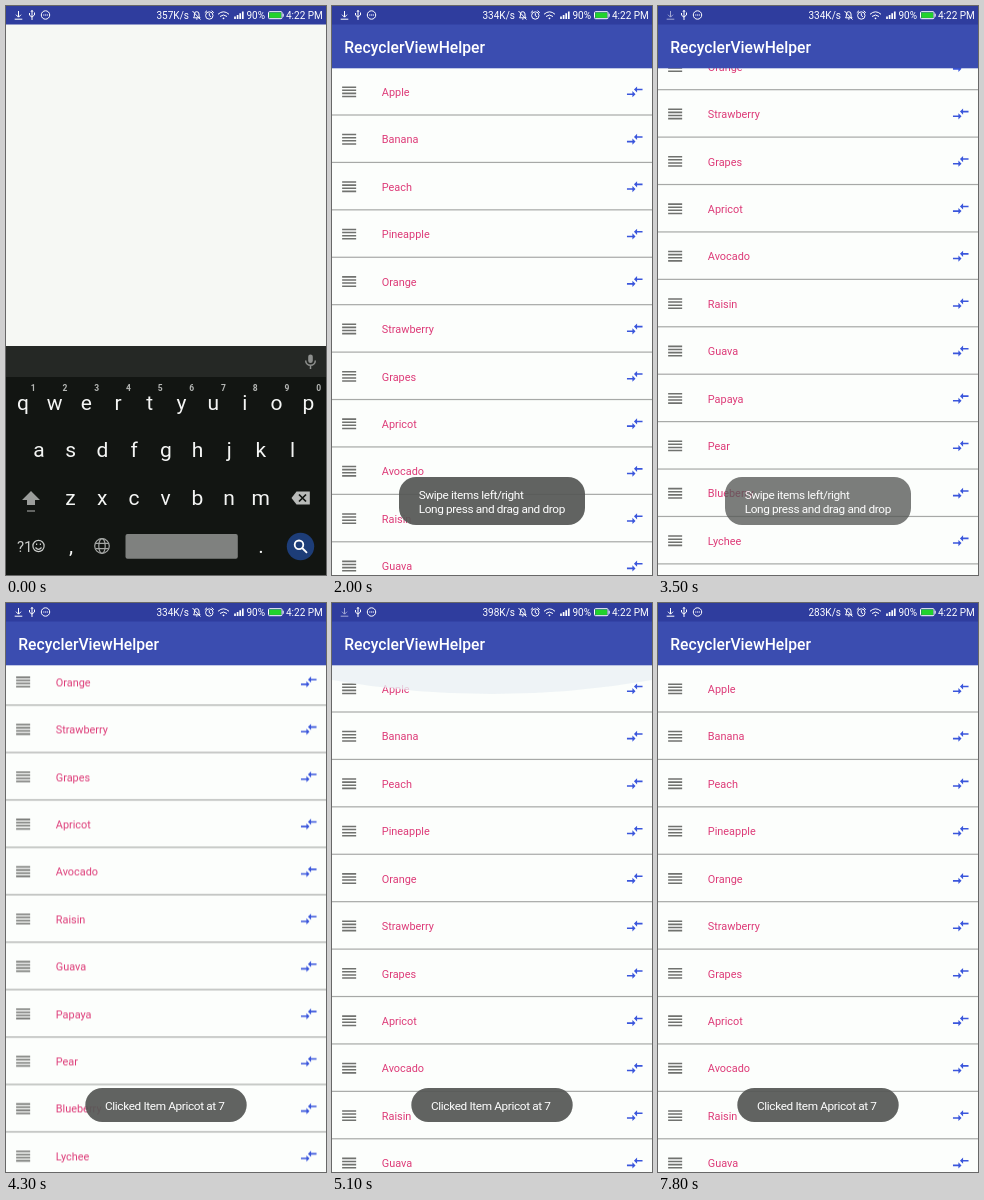
An HTML page that plays this animation: 320 by 569 pixels, repeating every 8 s.

```html
<!DOCTYPE html>
<html lang="en">
<head>
<meta charset="utf-8">
<title>RecyclerViewHelper</title>
<style>
html, body { margin: 0; width: 100%; height: 100%; overflow: hidden; background: #f6f8f4; }
svg { display: block; width: 100%; height: 100%; font-family: Roboto, sans-serif; }
.item { font-size: 10.9px; fill: #dd3b78; }
.title { font-size: 15.7px; font-weight: 500; fill: #fff; }
.status { font-size: 10px; fill: #fff; }
.line { fill: none; stroke: #fff; stroke-width: 1; }
.toast rect { fill: #565856; fill-opacity: .93; }
.toast text { font-size: 11.8px; letter-spacing: -.36px; fill: #fff; }
.key { font-size: 21px; fill: #f4f5f4; text-anchor: middle; }
.hint { font-size: 8.5px; font-weight: 700; fill: #b4b6b4; text-anchor: middle; }
#glow { transform-origin: 160px 62px; }
</style>
</head>
<body>
<svg viewBox="0 0 320 569">
  <defs>
    <g id="row">
      <rect y="46.4" width="320" height="1.2" fill="#a7a9a7"/>
      <path transform="translate(7.8 14.5) scale(.7788)" fill="#70726f"
        d="M3 5h18v2H3zM3 9h18v2H3zM3 13h18v2H3zM3 17h18v2H3z"/>
      <path transform="translate(293.4 14.5) scale(.7788)" fill="#3a56dc"
        d="M9 14H2v2h7v3l4-4-4-4zM15 13v-3h7V8h-7V5l-4 4z"/>
    </g>
  </defs>

  <rect width="320" height="569" fill="#f6f8f4"/>

  <g id="app">
    <rect y="62" width="320" height="507" fill="#fcfefc"/>
    <g id="list"></g>
    <path id="glow" d="M0 62H320V77Q160 105 0 77Z" fill="#eaf1f4" fill-opacity=".8"/>
    <rect y="18" width="320" height="44.3" fill="#3b4db0"/>
    <text class="title" x="12.3" y="46.7">RecyclerViewHelper</text>
  </g>

  <g id="keyboard">
    <rect y="340" width="320" height="229" fill="#121512"/>
    <rect y="340" width="320" height="31" fill="#252825"/>
    <g fill="none" stroke="#8e908e" stroke-width="1.5">
      <rect x="302.2" y="348.5" width="4.6" height="8.5" rx="2.3" fill="#8e908e" stroke="none"/>
      <path d="M299.7 354.5a4.8 4.8 0 0 0 9.6 0M304.5 359.5v3.5"/>
    </g>
    <g id="keys"></g>
    <path d="M25 485l9 9h-5v5h-8v-5h-5z" fill="#9b9d9b"/>
    <path d="M21 505h8" stroke="#777977" stroke-width="1.6"/>
    <path d="M285.5 492l5-6.5h13.3v13H290.500z" fill="#b9bbb9"/>
    <path d="M293 488.500l7 7m0-7l-7 7" stroke="#121512" stroke-width="1.7"/>
    <text x="11" y="546" font-size="15" fill="#c9cbc9">?1</text>
    <g fill="none" stroke="#c9cbc9" stroke-width="1.2">
      <circle cx="32.5" cy="540" r="5.6"/>
      <path d="M29.5 541.5q3 3.6 6 0M30.6 537.5v1.600M34.4 537.5v1.600"/>
    </g>
    <g fill="none" stroke="#a5a7a5" stroke-width="1.2">
      <circle cx="96" cy="540" r="7.3"/>
      <ellipse cx="96" cy="540" rx="3.2" ry="7.3"/>
      <path d="M89.500 537.4h13M89.500 542.6h13"/>
    </g>
    <rect x="119.5" y="528" width="112.300" height="24.700" rx="2" fill="#7f817f"/>
    <circle cx="294.5" cy="540.5" r="13.700" fill="#1d3d78"/>
    <g fill="none" stroke="#fff" stroke-width="1.8">
      <circle cx="293" cy="538.8" r="4.300"/>
      <path d="M296.200 542l4.800 4.800"/>
    </g>
  </g>

  <g id="toasts"></g>

  <rect width="320" height="18.500" fill="#2f3d9e"/>
  <g class="line">
    <path id="download" d="M12.500 5v6M10 8.700l2.500 2.500 2.500-2.500M8.700 13.200h7.600"/>
    <path d="M26 4.500v9.500M23.500 7v2.200l2.500 2M28.500 6.500v2.500l-2.500 2M25 5.800l1-1.500 1 1.500"/>
    <circle cx="39.500" cy="9" r="4.200"/>
    <path d="M37.200 9h1.200m.6 0h1.200m.6 0h1.200"/>
    <path d="M187.500 11.800h6.500l-1-1.600V8a2.300 2.300 0 0 0-4.600 0v2.200zM186.500 5l8 8.500M190 13h1.500"/>
    <circle cx="203.300" cy="9.500" r="3.700"/>
    <path d="M203.300 7.200v2.500l1.700 1M198.800 6.700l2.200-2M207.800 6.700l-2.200-2"/>
    <path d="M212 8.300q5.500-5 11 0M214 10.500q3.500-3 7 0"/>
    <circle cx="217.500" cy="12.300" r=".9" fill="#fff" stroke="none"/>
    <path stroke-width="1.700" d="M229 13v-2.500M231.600 13V9M234.200 13V7.200M236.800 13V5.500"/>
    <rect x="262.500" y="5.700" width="13.500" height="7" rx="1"/>
    <rect x="263.300" y="6.500" width="11.900" height="5.400" fill="#22d32c" stroke="none"/>
    <path d="M277.200 7.700v3"/>
  </g>
  <g id="speeds" class="status"></g>
  <text class="status" x="240.500" y="12.800">90%</text>
  <text class="status" x="280" y="12.800">4:22 PM</text>
</svg>

<script>
const LOOP = 8000;
const $ = id => document.getElementById(id);

function add(parent, tag, attrs, text = '') {
  const el = document.createElementNS('http://www.w3.org/2000/svg', tag);
  for (const name in attrs) el.setAttribute(name, attrs[name]);
  el.textContent = text;
  return parent.appendChild(el);
}

// steps: [time, value, easing towards the next step]
function play(el, prop, steps) {
  const full = [[0, steps[0][1]], ...steps, [LOOP, steps.at(-1)[1]]];
  el.animate(full.map(([time, value, easing = 'linear']) =>
    ({ offset: time / LOOP, [prop]: value, easing })),
    { duration: LOOP, iterations: Infinity });
}

const fruits = ['Apple', 'Banana', 'Peach', 'Pineapple', 'Orange', 'Strawberry', 'Grapes', 'Apricot',
  'Avocado', 'Raisin', 'Guava', 'Papaya', 'Pear', 'Blueberry', 'Lychee'];
fruits.forEach((name, i) => {
  const row = add($('list'), 'g', { transform: `translate(0 ${62 + i * 47.42})` });
  add(row, 'use', { href: '#row' });
  add(row, 'text', { class: 'item', x: 49.8, y: 28 }, name);
});

function keyRow(letters, x, y) {
  [...letters].forEach((letter, i) =>
    add($('keys'), 'text', { class: 'key', x: x + i * 31.7, y }, letter));
}
keyRow('qwertyuiop', 17, 403.5);
keyRow('asdfghjkl', 33, 451.3);
keyRow('zxcvbnm', 64.5, 499.3);
keyRow(',', 65, 547);
keyRow('.', 255, 547);
[...'1234567890'].forEach((digit, i) =>
  add($('keys'), 'text', { class: 'hint', x: 27.3 + i * 31.7, y: 384.7 }, digit));

function toast(x, y, width, height, lines, fade) {
  const box = add($('toasts'), 'g', { class: 'toast' });
  add(box, 'rect', { x, y, width, height, rx: 17 });
  lines.forEach((line, i) =>
    add(box, 'text', { x: x + 19.7, y: y + 21.7 + i * 14.6 }, line));
  play(box, 'opacity', fade);
}
toast(67, 471, 186, 48, ['Swipe items left/right', 'Long press and drag and drop'],
  [[200, 0], [400, .83], [500, 1], [3350, 1], [3500, .84], [3750, 0]]);
toast(79.3, 485, 161.4, 34, ['Clicked Item Apricot at 7'], [[3800, 0], [4100, 1]]);

const speeds = [[0, 357], [1600, 334], [4600, 398], [7000, 283], [LOOP]];
speeds.slice(0, -1).forEach(([start, rate], i) => {
  const label = add($('speeds'), 'text', { x: 150.5, y: 12.8 }, rate + 'K/s');
  const end = speeds[i + 1][0];
  const steps = [[start, 1, 'step-end']];
  if (start) steps.unshift([0, 0, 'step-end']);
  if (end < LOOP) steps.push([end, 0]);
  play(label, 'opacity', steps);
});

const shift = y => `translateY(${y}px)`;
play($('keyboard'), 'transform', [[50, shift(0), 'ease-in'], [260, shift(232)]]);
play($('app'), 'opacity', [[90, 0], [300, 1]]);
play($('list'), 'transform', [
  [2720, shift(0), 'cubic-bezier(.3,.3,.5,1)'], [3500, shift(-215), 'ease-in-out'],
  [3850, shift(-196.6)], [4520, shift(-196.6), 'cubic-bezier(.4,.1,.8,.9)'], [5020, shift(0)]]);
play($('glow'), 'opacity', [[5000, 0], [5080, 1], [5150, 1], [5500, 0]]);
play($('glow'), 'transform', [[5000, 'scaleY(0)'], [5100, 'scaleY(1)'], [5500, 'scaleY(.2)']]);

$('download').animate([
  { opacity: 1, offset: 0, easing: 'step-end' },
  { opacity: .55, offset: .125, easing: 'step-end' },
  { opacity: 1, offset: .24 }, { opacity: 1, offset: 1 }],
  { duration: LOOP / 5, iterations: Infinity });
</script>
</body>
</html>
```
